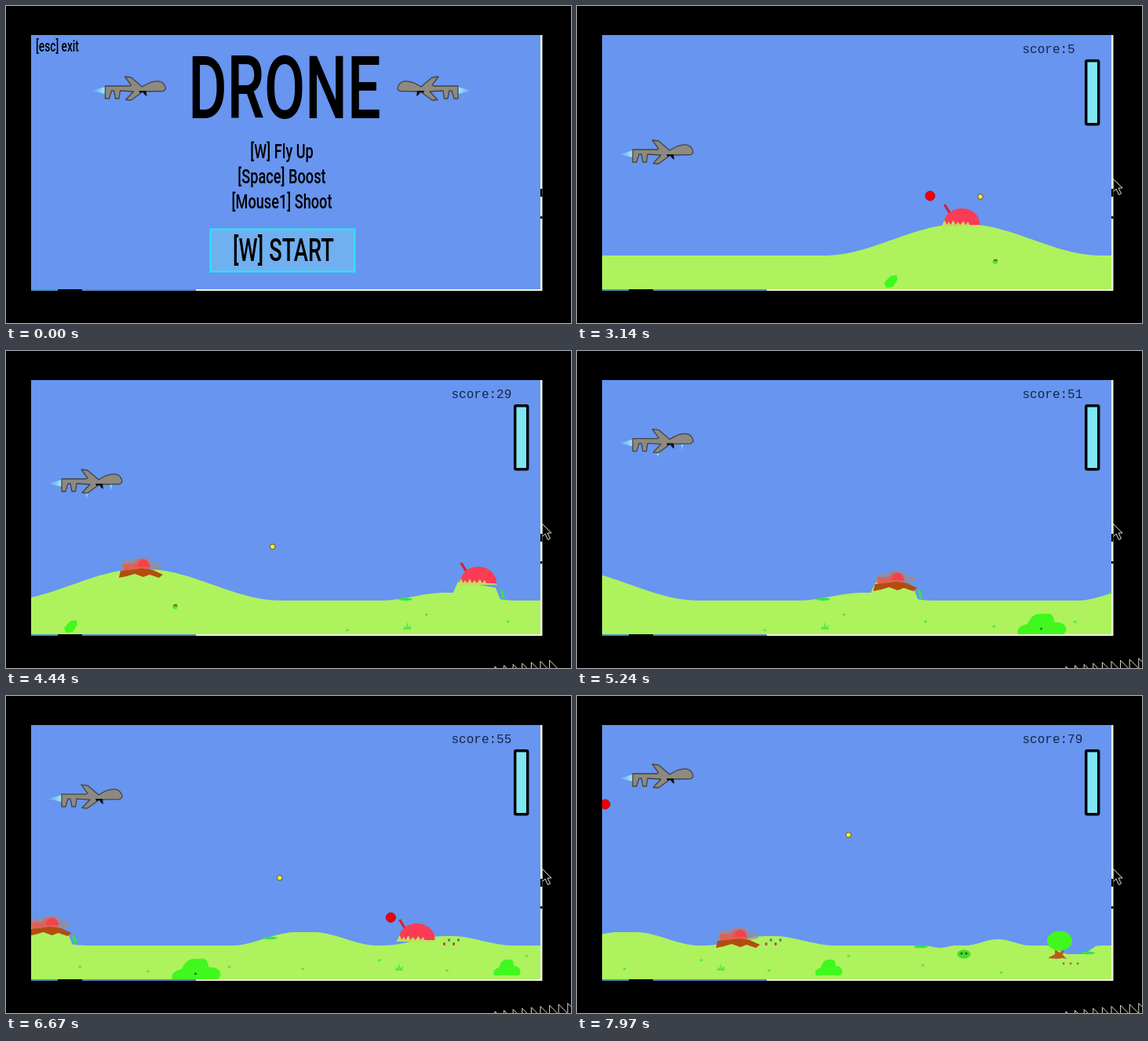
Recreate the animation shown at these times as an HTML page. Size 720x404 px, loop 8000 ms.

```html
<!DOCTYPE html>
<html lang="en">
<head>
<meta charset="utf-8">
<title>Drone</title>
<style>
  html, body { margin: 0; width: 100%; height: 100%; overflow: hidden; background: #000; }
  svg { display: block; width: 100vw; height: 100vh; }
  #labels { font-family: Roboto, "Open Sans", sans-serif; font-weight: 500; text-anchor: middle; }
  #score { font: 16px "Liberation Mono", "DejaVu Sans Mono", monospace; fill: #182644; }
</style>
</head>
<body>
<svg viewBox="0 0 720 404">
  <defs>
    <clipPath id="view"><rect x="32" y="37" width="649.5" height="324"/></clipPath>
    <linearGradient id="flame">
      <stop offset="0" stop-color="#7fc4f4" stop-opacity=".3"/>
      <stop offset="1" stop-color="#9ff0fa"/>
    </linearGradient>
    <g id="craft">
      <path d="M54 97L71 92V101Z" fill="url(#flame)"/>
      <path d="M71 91H102L104 90L96 79L104 80L118 92L125 88Q136 83 143 86Q148 90 148 95L145 97.5L119 98L104 109L97 108.5L107 98L90 97L88.5 107H84L82 97H79L76 107H71Z"
        fill="#8c8a82" stroke="#45443c" stroke-width="1.3" stroke-linejoin="round"/>
      <path d="M114 97H123L124 104L121 102L119 99L115 100Z" fill="#111"/>
    </g>
    <g id="dome">
      <path d="M-22-26L-14-13" stroke="#d8202c" stroke-width="3.2"/>
      <path d="M-23 0C-23-28 23-28 23 0Z" fill="#fa3c54"/>
      <path d="M-26 2L-22-6L-19 0L-17-4L-14 0L-11-6L-8 0L-5-4L-2 0L2-5L5 0L8-4L10 0H20L25 2Z" fill="#c4dc62"/>
    </g>
    <g id="wreck">
      <path d="M-24-9L-20-13H-10L-4-16H12L15-11L26-9L27-2L10 1L-24 0Z" fill="#a08c86" opacity=".6"/>
      <path d="M-22-8H-8Q-4-15 4-14Q11-14 13-5L12 1H-21Z" fill="#dc6258"/>
      <path d="M-4-4Q-2-13 5-13Q11-12 12-4Z" fill="#f4404c"/>
      <path d="M-27 10L-25 1L-12 0L2-2L16 0L29 6L24 10L12 6L4 9L-7 5L-17 8Z" fill="#b44c10"/>
    </g>
    <path id="arrow" d="M0 0V17L4 13L7.5 20.5L10.5 19L7 12H12Z" stroke="#e2e0cc"/>
  </defs>

  <rect width="720" height="404"/>
  <rect x="32" y="37" width="650" height="324" fill="#6795f0"/>

  <g id="menu">
    <use href="#craft" x="55.5" y="11"/>
    <use href="#craft" transform="matrix(-1 0 0 1 647 11)"/>
    <rect x="260.5" y="284.5" width="184" height="54" fill="#70b0f0" stroke="#2ce4f4" stroke-width="2.2"/>
    <g id="labels"></g>
  </g>

  <g id="game">
    <g clip-path="url(#view)">
      <g id="world"></g>
      <g id="shots"></g>
      <g id="player">
        <path id="jets" d="M101 108H105L103 115ZM132.5 97H135.5L134 106Z" fill="#8fdcf8"/>
        <use href="#craft"/>
      </g>
    </g>
    <text id="score" x="567.5" y="60"></text>
    <rect x="648.7" y="69.7" width="16" height="81" rx="1.5" fill="#80e6f4" stroke="#000" stroke-width="3.5"/>
    <use href="#arrow" x="683" y="220"/>
  </g>

  <path d="M681 37h2.5v326H242v-2H681z" fill="#f2f1dc"/>
  <path d="M681 233h2.5v10h-2.5zM681 268h2.5v3h-2.5z"/>
  <path d="M32 361h34v2H32z" fill="#3f98bc"/>
  <path d="M97 361h145v2H97z" fill="#5c84c4"/>
  <g id="trail"></g>
</svg>

<script>
// Times are in frames, speeds in pixels per frame.
const FPS = 30, FRAMES = 240, START = 52, SCROLL = 8.14;
const GUN_X = 122, BULLET_SPEED = 21, BALL_VX = -11.65, BALL_VY = -3.7;
const LEAF = '#40f81e', SHADE = '#36e24c', SPECK = '#5be848';

const flight = [[52, 80], [61, 95], [94, 187], [115, 213], [133, 167], [181, 83], [205, 138], [219, 113], [239, 103]];
// Centre, half width, height and flat half width.
const hills = [[760, 175, 40, 5], [1150, 85, 10, 5], [1186, 30, 14, 24], [1512, 92, 17, 12],
  [1695, 82, 12, 5], [1911, 20, -3, 0], [1985, 42, 8, 0], [2083, 30, -11, 10]];
// A ball passes through the given frame, x and y.
const domes = [
  { x: 759, y: 279, hit: 111, ball: [94, 450, 242] },
  { x: 1188, y: 296, hit: 142 },
  { x: 1655, y: 311, hit: 206, ball: [219, 269, 212] }
];
const aims = [[94, 514, 243], [181, 422, 238], [219, 213, 164], [239, 346, 177]];

const $ = id => document.getElementById(id);
const show = (el, on) => el.setAttribute('display', on ? 'inline' : 'none');
const range = (n, f) => Array.from({ length: n }, (_, i) => f(i));
const clamp = u => Math.min(1, Math.max(0, u));
const ease = u => u * u * (3 - 2 * u);
const scroll = n => SCROLL * (n - 61);
const ground = x => hills.reduce((y, [c, half, h, flat]) =>
  y - h * ease(clamp((half - Math.abs(x - c)) / (half - flat))), 318);

// Smooth curve through the flight points.
function altitude(n) {
  const last = flight.length - 1;
  let i = 0;
  while (i < last - 1 && n >= flight[i + 1][0]) i++;
  const slope = j => {
    const p = flight[Math.max(j - 1, 0)], q = flight[Math.min(j + 1, last)];
    return (q[1] - p[1]) / (q[0] - p[0]);
  };
  const [n0, y0] = flight[i], [n1, y1] = flight[i + 1];
  const w = n1 - n0, u = (n - n0) / w, v = 1 - u;
  return v * v * ((1 + 2 * u) * y0 + u * w * slope(i)) + u * u * ((3 - 2 * u) * y1 - v * w * slope(i + 1));
}

// Each bullet leaves the gun so that it reaches its aim in time.
function bullet([n, x, y], end = FRAMES) {
  const fired = n - (x - GUN_X) / BULLET_SPEED, y0 = altitude(fired) + 5;
  return { fired, end, y0, vy: (y - y0) / (n - fired) };
}
const bullets = [
  ...aims.map(a => bullet(a)),
  ...domes.map(d => bullet([d.hit, d.x - scroll(d.hit), d.y - 6], d.hit))
];

const blob = (x, y, rx, ry, fill) => `<ellipse cx="${x}" cy="${y}" rx="${rx}" ry="${ry}" fill="${fill}"/>`;
const path = (d, fill) => `<path d="${d}" fill="${fill}"/>`;
const bush = (x, y, w, h) => path(`M${x - w} ${y}q-2-${h * .4} ${w * .4}-${h * .5}q${w * .2}-${h * .6} ${w * .7}-${h * .5}` +
  `q${w * .4}-${h * .1} ${w * .4} ${h * .4}q${w * .5} 0 ${w * .5} ${h * .4}l-${w * .1} ${h * .2}z`, LEAF);
const tuft = (x, y) => path(`M${x - 5} ${y}l2-5l2 3l1-8l2 7l3-3v6z`, SPECK);

function buildWorld() {
  const land = path(`M-200 370${range(420, i => `L${i * 6 - 200} ${ground(i * 6 - 200)}`).join('')}V370Z`, '#aef25e');
  const streaks = [1095, 1468, 1887, 2100].map(x => blob(x, ground(x) + 1.5, 9, 1.8, SHADE)).join('');
  let seed = 7;
  const random = () => (seed = seed * 16807 % 2147483647) / 2147483647;
  const specks = range(11, i => blob(1021 + i * 95 + random() * 20, 330 + random() * 28, 2, 1.6, SPECK)).join('');
  const flowers = range(4, i => blob(1690 + i * 6, i % 2 ? 311 : 316, 1.6, 2, i % 2 ? '#4f8a64' : '#b84848')).join('');
  const seeds = range(3, i => blob(2069 + i * 9, 341, 1.4, 1.4, '#a8683c')).join('');
  const plants = path('M660 353L668 344L676 343L677 349L671 358L663 359Z', LEAF) +
    blob(801.5, 326, 3.5, 3, LEAF) + blob(802, 324, 2.5, 1.5, '#8c5a38') +
    bush(1374, 361, 31, 26) + blob(1373, 354, 1.5, 1.5, '#16761c') + bush(1770, 356, 17, 20) +
    blob(1942, 329, 8.5, 5.8, '#48dc30') + blob(1939, 328, 1.5, 1.5, '#245c20') + blob(1945, 328, 1.5, 1.5, '#245c20') +
    path('M1216 305l3-1l3 11h-4z', SHADE) + tuft(1097, 355) + tuft(1632, 350);
  const tree = path('M2058 323l6 4l6-4l-2 7l5 5l-6-1l-6 1l-12-1l9-5z', '#b85e1c') + blob(2064, 312, 16, 12.5, LEAF);
  const targets = domes.map(({ x, y }, i) => `<use id="dome${i}" href="#dome" x="${x}" y="${y}"/>` +
    `<use id="wreck${i}" href="#wreck" x="${x - 2}" y="${y}"/>`).join('');
  $('world').innerHTML = land + streaks + specks + plants + tree + seeds + flowers + targets;
}

function buildMenu() {
  // Every label shares one condensed face.
  const label = (text, x, y, size) =>
    `<text transform="translate(${x} ${y}) scale(.685 1)" font-size="${size}">${text}</text>`;
  $('labels').innerHTML = label('[esc] exit', 65.5, 58, 20) + label('DRONE', 355, 143, 110.5) +
    ['[W] Fly Up', '[Space] Boost', '[Mouse1] Shoot'].map((s, i) => label(s, 351.5, 194 + 32 * i, 26.5)).join('') +
    label('[W] START', 353.5, 325, 40);
}

function buildTrail() {
  $('trail').innerHTML = range(9, i => `<use href="#arrow" x="${623 + i * 11.6}" y="${402 - i * 1.3}"/>`).join('');
}

function drawShots(n) {
  let out = '';
  for (const { fired, end, y0, vy } of bullets) {
    const x = GUN_X + BULLET_SPEED * (n - fired), y = y0 + vy * (n - fired);
    if (n >= fired && n < end && y < ground(x + scroll(n)))
      out += `<circle cx="${x}" cy="${y}" r="3.3" fill="#fbec34" stroke="#55552c"/>`;
  }
  for (const { x: home, ball } of domes) {
    if (!ball) continue;
    const [at, x0, y0] = ball, x = x0 + BALL_VX * (n - at), y = y0 + BALL_VY * (n - at);
    if (x < home - 22 - scroll(n))
      out += `<circle cx="${x}" cy="${y}" r="6" fill="#f00008" stroke="#b8000c"/>`;
  }
  $('shots').innerHTML = out;
}

function draw(ms) {
  const n = Math.floor(ms * FPS / 1000 + .01) % FRAMES, playing = n >= START;
  show($('menu'), !playing);
  show($('game'), playing);
  [...$('trail').children].forEach((el, i) => show(el, n >= 104 + i * 4.5));
  if (!playing) return;

  $('world').setAttribute('transform', `translate(${-scroll(n)} 0)`);
  $('player').setAttribute('transform', `translate(0 ${altitude(n) - 95})`);
  show($('jets'), altitude(n + .5) - altitude(n - .5) < -.8);
  let score = 1 + Math.floor((n - START) / 10);
  domes.forEach(({ hit }, i) => {
    const dead = n >= hit;
    show($('dome' + i), !dead);
    show($('wreck' + i), dead);
    if (dead) score += 20;
  });
  $('score').textContent = 'score:' + score;
  drawShots(n);
}

buildWorld();
buildMenu();
buildTrail();
const begin = performance.now();
function tick() {
  draw((performance.now() - begin) % 8000);
  requestAnimationFrame(tick);
}
tick();
</script>
</body>
</html>
```
